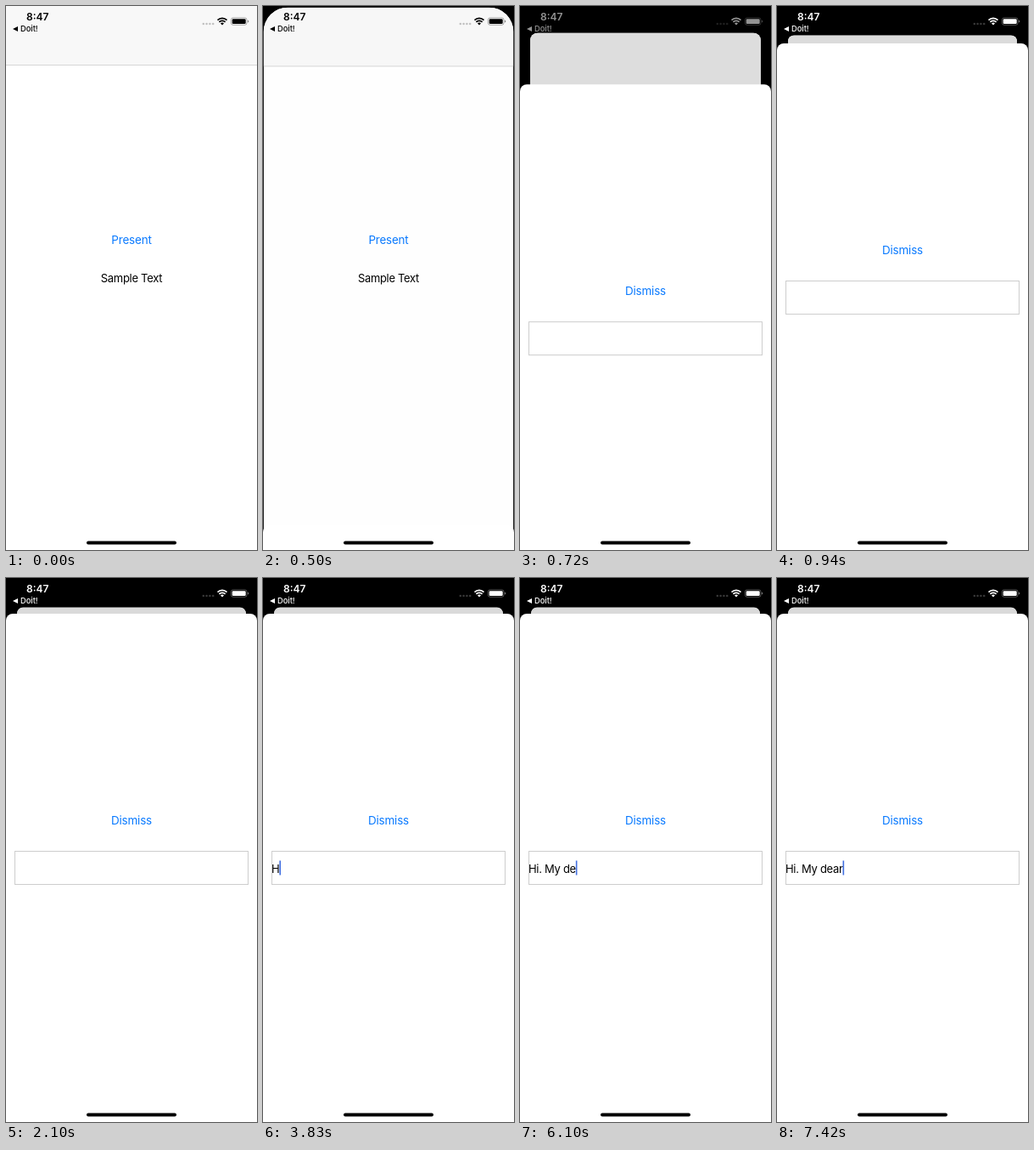
These frames come from a looping animation (296 by 640 pixels, 8 s). An HTML page:

```html
<!DOCTYPE html>
<html lang="en">
<head>
<meta charset="utf-8">
<title>Modal sheet</title>
<style>
html, body { margin: 0; height: 100%; overflow: hidden; background: #000; }
svg { display: block; width: 296px; height: 640px; font: 13px Inter, "Liberation Sans", sans-serif; }
.button { font-size: 13.5px; fill: #0a7aff; letter-spacing: -.2px; }
.label { letter-spacing: -.3px; white-space: pre; }
.mid { text-anchor: middle; }
</style>
</head>
<body>
<svg viewBox="0 0 296 640">
  <defs>
    <clipPath id="corners"><rect id="cornerBox" width="296" height="700"/></clipPath>
  </defs>
  <rect width="296" height="640"/>

  <g id="card" clip-path="url(#corners)">
    <rect width="296" height="640" fill="#fff"/>
    <rect width="296" height="69" fill="#f8f8f8"/>
    <rect y="69" width="296" height="1" fill="#d6d6d6"/>
    <text class="button mid" x="148" y="280">Present</text>
    <text class="label mid" x="148" y="325">Sample Text</text>
    <rect id="shade" width="296" height="640"/>
  </g>

  <g id="sheet">
    <rect width="296" height="700" rx="8" fill="#fff"/>
    <text class="button mid" x="148" y="247.5">Dismiss</text>
    <rect x="10.5" y="279.5" width="275" height="39" fill="none" stroke="#cdcdcd"/>
    <text id="entry" class="label" x="10" y="304.5"></text>
    <rect id="caret" y="290.5" width="1.6" height="17" fill="#416fe0"/>
  </g>

  <g id="status">
    <text x="24" y="17" font-size="12" font-weight="600">8:47</text>
    <path d="M8 27l6-3v6z"/>
    <text x="17" y="30.3" font-size="9.3" font-weight="500">Doit!</text>
    <g opacity=".22">
      <circle cx="232.8" cy="21" r="1.3"/><circle cx="236.6" cy="21" r="1.3"/>
      <circle cx="240.4" cy="21" r="1.3"/><circle cx="244.2" cy="21" r="1.3"/>
    </g>
    <g fill="none" stroke="currentColor" stroke-width="1.7">
      <path d="M249.5 16.6a7.7 7.7 0 0 1 11 0M251.4 18.9a5 5 0 0 1 7.2 0"/>
    </g>
    <path d="M255 22.6l-2-2a2.8 2.8 0 0 1 4 0z"/>
    <rect x="265.4" y="13.9" width="18.6" height="8.4" rx="2.4" fill="none" stroke="currentColor" stroke-width=".8" opacity=".4"/>
    <rect x="266.7" y="15.2" width="16" height="5.8" rx="1.3"/>
    <path d="M285 16.6q1.4 .5 1.4 1.5t-1.4 1.5z" opacity=".45"/>
  </g>
  <rect x="95" y="629.6" width="106" height="4" rx="2"/>
</svg>
<script>
const LOOP = 8000, OPEN = 500, STEP = 110, SETTLED = 2100;
const $ = id => document.getElementById(id);
const set = (id, attrs) => {
  for (const name in attrs) $(id).setAttribute(name, attrs[name]);
};
const mix = (a, b, p) => a + (b - a) * p;

// [start, text, caret shown]
const typing = [
  [0, "", 0], [2350, "", 1], [2990, "", 0], [3230, "", 1],
  [3830, "H", 1], [4190, "Hi.", 1], [5030, "Hi. M", 1], [5290, "Hi. My", 1],
  [5590, "Hi. My ", 1], [5880, "Hi. My d", 1], [6100, "Hi. My de", 1],
  [6730, "Hi. My de", 0], [6960, "Hi. My d", 1], [7120, "Hi. My de", 1],
  [7250, "Hi. My dea", 1], [7420, "Hi. My dear", 1]
];

// Critically damped spring, advanced in held steps
function progress(t) {
  if (t < OPEN) return 0;
  if (t >= SETTLED) return 1;
  const x = .35 + 1.88 * Math.min(4, Math.floor((t - OPEN) / STEP));
  return 1 - (1 + x) * Math.exp(-x);
}

function draw(t) {
  const p = progress(t);
  const inset = 13 * p;
  set("card", { transform: `translate(${inset} ${34.5 * p}) scale(${1 - inset / 148})` });
  set("cornerBox", { rx: p ? mix(30, 8, p) : 0 });
  set("shade", { opacity: .12 * p });
  set("sheet", { transform: `translate(0 ${mix(640, 42, p)})` });

  const held = Math.floor(Math.max(0, t - OPEN) / STEP) * STEP;
  const f = Math.min(1, held / 400);
  const level = Math.round(255 * f * f * (3 - 2 * f));
  const tint = `rgb(${level},${level},${level})`;
  set("status", { fill: tint, color: tint });

  const [, text, shown] = typing.findLast(([start]) => t >= start);
  $("entry").textContent = text;
  const width = text ? $("entry").getComputedTextLength() : 0;
  set("caret", { x: 10 + width, opacity: shown });
}

function frame() {
  draw(performance.now() % LOOP);
  requestAnimationFrame(frame);
}
frame();
</script>
</body>
</html>
```
